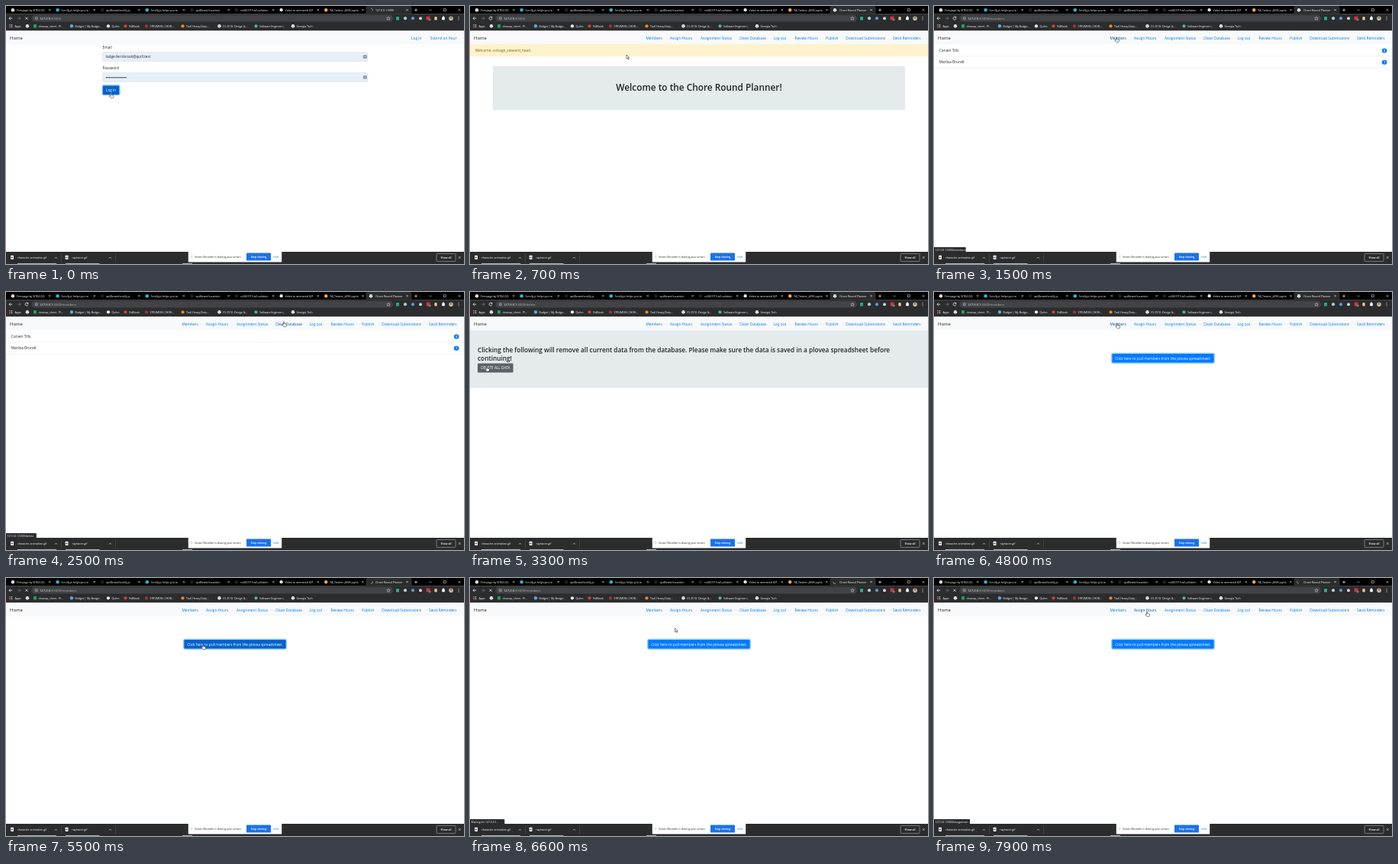
An HTML page for the animation above (8000 ms loop, 600 px wide and 338 px high).

```html
<!DOCTYPE html>
<html lang="en">
<head>
<meta charset="utf-8">
<title>Chore Round Planner</title>
<style>
html, body { margin: 0; width: 100%; height: 100%; overflow: hidden; background: #fff; }
#stage { display: block; width: 100%; height: 100%; font-family: "Open Sans", "Noto Sans", sans-serif; }
text { white-space: pre; }
.chrome { font-weight: 500; }
</style>
</head>
<body>
<svg id="stage" viewBox="0 0 600 338"></svg>
<script>
const LOOP = 8000, STEP = 100;
const APP = 'Chore Round Planner', HOST = '127.0.0.1', PORT = ':5000';
const BLUE = '#007bff', INK = '#212529', BAR = '#2b2c2e', LIGHT = '#fff', PANEL = '#e5eaec';
const stage = document.getElementById('stage');

const text = (x, y, size, str, fill = INK, attrs = '') =>
  `<text x="${x}" y="${y}" font-size="${size}" fill="${fill}" ${attrs}>${str}</text>`;
const rect = (x, y, w, h, fill, attrs = '') =>
  `<rect x="${x}" y="${y}" width="${w}" height="${h}" fill="${fill}" ${attrs}/>`;
const dot = (x, y, r, fill, attrs = '') => `<circle cx="${x}" cy="${y}" r="${r}" fill="${fill}" ${attrs}/>`;
const line = (d, stroke = LIGHT, width = .6, attrs = '') =>
  `<path d="${d}" fill="none" stroke="${stroke}" stroke-width="${width}" ${attrs}/>`;
const cross = (x, y, r, stroke, width) =>
  line(`M${x - r} ${y - r}l${2 * r} ${2 * r}M${x + r} ${y - r}l${-2 * r} ${2 * r}`, stroke, width);
const globe = (x, y) => dot(x, y, 2.2, LIGHT) +
  line(`M${x - 1.5} ${y - .6}q1 .1 1.2 .9t1 1M${x + .3} ${y - 1.6}q0 1 1.4 1`, '#555', .55);
const group = (id, body, attrs = '') => `<g id="${id}" ${attrs}>${body}</g>`;
const middle = 'text-anchor="middle"', semibold = 'font-weight="600"';
const focusRing = (x, y, w, h) =>
  rect(x - .5, y - .5, w + 1, h + 1, 'none', 'rx="1.6" stroke="#80bdff" stroke-width="1"');

// Browser chrome
const icons = {
  globe,
  teal: (x, y) => dot(x, y, 2.3, '#25b7d3'),
  dark: (x, y) => dot(x, y, 2.2, '#1f2124'),
  white: (x, y) => dot(x, y, 2.1, '#eee'),
  orange: (x, y) => dot(x, y, 2.2, '#f0a94a'),
  green: (x, y) => rect(x - 2, y - 2.2, 4, 4.4, '#1ea362', 'rx=".4"'),
  blue: (x, y) => dot(x, y, 2.2, '#6aa6c9'),
  red: (x, y) => dot(x, y, 2.1, '#e23a2e'),
  brick: (x, y) => dot(x, y, 2.1, '#a3332c'),
  amber: (x, y) => dot(x, y, 2.1, '#e8862e'),
  lime: (x, y) => dot(x, y, 2.1, '#52b788')
};

const tabs = [
  ['globe', 'Fernpage by SITE4 GO'], ['teal', 'Scrolly.js helps you to'],
  ['dark', 'quillbrant/scrolly.js'], ['teal', 'Scrolly.js helps you to'],
  ['dark', 'quillbrant/cuuemin'], ['dark', 'cs3451f19-a3-solution'],
  ['white', 'Video to animated GIF'], ['orange', 'PA_Twister_4496.ipynb']
];
const tabStrip = tabs.map(([icon, title], i) => {
  const x = 9 + i * 58.6;
  return icons[icon](x, 5.2) +
    `<svg x="${x + 5}" y="0" width="41.5" height="10">${text(0, 6.6, 3.56, title, LIGHT)}</svg>` +
    cross(x + 48.2, 5.2, 1.1, LIGHT, .55);
}).join('');

const bookmarks = [
  [28, 'globe', ''], [38, 'green', 'cleanup_sheet - Pl...'], [86, 'blue', 'Budget | My Budge...'],
  [134, 'white', 'Quilm'], [156.5, 'red', 'VidNook'], [184, 'brick', 'STRUMDEL CHOR...'],
  [231.5, 'amber', 'Tovil Heavy-Duty...'], [279.5, 'globe', 'CS 2510: Design &amp;...'],
  [327.5, 'lime', 'Software Engineeri...'], [376, 'globe', 'Georgia Tech']
];
const bookmarkBar = bookmarks.map(([x, icon, label]) =>
  icons[icon](x, 26.3) + text(x + 4.5, 27.6, 3.5, label, LIGHT)).join('');

let appGrid = '';
for (let i = 0; i < 9; i++)
  appGrid += rect(4 + i % 3 * 1.6, 24 + Math.floor(i / 3) * 1.6, 1.1, 1.1, ['#e2574c', '#5a9bf0', '#eac04c'][i % 3]);

const extensions =
  line('M501 13.9l.7 1.5 1.6 .2-1.2 1.1 .3 1.6-1.4-.8-1.4 .8 .3-1.6-1.2-1.1 1.6-.2z', LIGHT, .4) +
  rect(511, 14, 4, 4.4, '#1eb08a', 'rx=".5"') + dot(523, 16.2, 2.1, '#b9c4cb') +
  dot(533, 16.2, 2.1, '#5f92c8') + dot(543, 16.2, 2, '#d4d9d6') +
  rect(550.5, 13.6, 5, 4.6, '#d6303e', 'rx=".8"') + rect(553.5, 16.5, 3, 2.8, '#777', 'rx=".5"') +
  rect(561.3, 14, 3.4, 4.4, '#e6c789', 'rx="1"') +
  rect(571.2, 14.6, 3.6, 3.6, LIGHT, 'rx=".5"') + dot(573, 14.2, .9, LIGHT) +
  dot(583, 16.2, 2.8, '#c9b8a5') + dot(583, 15.5, 1.1, '#6f5a4c') +
  [14.5, 16.2, 17.9].map(y => dot(593, y, .5, LIGHT)).join('');

const topChrome =
  rect(0, 0, 600, 10.5, '#000') + tabStrip +
  `<path d="M469.5 10.5q2 0 2-2v-6.5q0-2 2-2h56q2 0 2 2v6.5q0 2 2 2z" fill="${BAR}"/>` +
  rect(0, 10.3, 600, 21.9, BAR) +
  group('favicon', globe(478, 5.2)) +
  group('spinner', line('M478 3a2.3 2.3 0 0 1 2 3.4', '#b4b8bd', .7)) +
  `<svg x="484" y="0" width="38" height="10">${text(0, 6.6, 3.56, '', LIGHT, 'id="tabTitle"')}</svg>` +
  cross(525.5, 5.2, 1.1, LIGHT, .55) + line('M537 3.3v4M535 5.3h4', LIGHT, .6) +
  line('M554.5 5.3h3', LIGHT, .5) + rect(573.5, 3.8, 2.9, 2.9, 'none', `stroke="${LIGHT}" stroke-width=".5"`) +
  cross(594, 5.3, 1.4, LIGHT, .5) +
  rect(33.5, 11.8, 473.5, 8.8, '#424346', 'rx="4.4"') +
  line('M8.4 16.2h-4.4m2-2l-2 2 2 2', LIGHT, .7) + line('M14.8 16.2h4.4m-2-2l2 2-2 2', '#85878a') +
  group('reload', line('M28.7 14.9a2 2 0 1 0 .3 1.8M29 13.8v1.5h-1.6', LIGHT, .7)) +
  group('stop', cross(27, 16.2, 1.5, LIGHT, .7)) +
  dot(39.8, 16.2, 1.7, 'none', 'stroke="#e0e0e0" stroke-width=".5"') + line('M39.8 15.9v1.2M39.8 15v.4', '#e0e0e0', .5) +
  text(44, 17.8, 4.15, `${HOST}<tspan id="path" fill="#b4b6b9"></tspan>`, LIGHT) +
  extensions + appGrid + text(11.5, 27.6, 3.56, 'Apps', LIGHT) + bookmarkBar;

const download = (x, name, end) =>
  rect(x - 1.8, 326.8, 3.8, 5.2, '#f2f2f2', 'rx=".4"') + dot(x, 329.6, 1, '#555') +
  text(x + 7, 331.3, 3.56, name, LIGHT) + line(`M${end - 8.5} 330.6l1.5-1.5 1.5 1.5`) +
  line(`M${end} 324.5v11`, '#66686b', .4);

const bottomChrome =
  rect(0, 322, 600, 16, BAR) + download(8, 'character animation.gif', 72.5) + download(79.5, 'raytracer.gif', 143.5) +
  line('M15 337.5h51M78 337.5h44.5M231 337.5h13', '#d4d6d8', .8) +
  rect(564, 324.4, 25, 10.2, 'none', 'rx="1.2" stroke="#c4c6c8" stroke-width=".5"') +
  text(576.5, 331, 3.5, 'Show all', LIGHT, middle + ' ' + semibold) + cross(594.2, 329.5, 1.5, LIGHT, .5) +
  rect(238.8, 321.6, 122.4, 13.9, '#fff') +
  line('M242.6 326.5v4M243.8 326.5v4', '#b4b4b4', .4) +
  text(247, 330.2, 3.35, 'Screen Recorder is sharing your screen.', '#222') +
  rect(315, 323.6, 32, 10, '#1a73e8', 'rx=".9"') + text(331, 330.1, 3.4, 'Stop sharing', '#fff', middle + ' ' + semibold) +
  text(350, 330.2, 3.5, 'Hide', '#1a73e8');

// Web pages
const link = (x, label) => text(x, 43.5, 4.8, label, BLUE, 'class="link"');
const menu = [[230.5, 'Members'], [262, 'Assign Hours'], [302, 'Assignment Status'], [353, 'Clean Database'],
  [397.5, 'Log out'], [425.5, 'Review Hours'], [466, 'Publish'], [492.3, 'Download Submissions'], [554, 'Send Reminders']];

const field = (y, value) =>
  rect(126.6, y, 347.2, 12, '#e6f0fa', 'rx="1.2" stroke="#ced4da" stroke-width=".4"') + value +
  rect(467.8, y + 3.8, 5, 4.4, '#8d9399', 'rx=".6"') +
  [469, 470.3, 471.6].map(x => dot(x, y + 6, .4, '#fff')).join('');
const bullets = Array.from({ length: 14 }, (_, i) => dot(131.6 + i * 1.95, 93.8, .78, INK)).join('');

const loginPage =
  link(531, 'Log in') + link(555.7, 'Submit an hour') +
  text(126.5, 56, 4.75, 'Email') + field(60.5, text(130.5, 68.3, 4.75, 'lodge.fernbrook@quill.test')) +
  text(126.5, 83, 4.75, 'Password') + field(87.4, bullets) +
  rect(126.6, 104.2, 22, 12, '#0062cc', 'rx="1.2"') + focusRing(126.6, 104.2, 22, 12) +
  text(137.6, 112, 4.75, 'Log in', '#fff', middle);

const welcome = rect(30, 57.6, 540, 57.6, PANEL, 'rx="1.4"') +
  text(300, 90, 11.85, `Welcome to the ${APP}!`, INK, middle + ' ' + semibold);
const flash = rect(0, 50.2, 600, 15.8, '#fff3cd') + line('M0 50.3h600M0 65.9h600', '#ffeeba', .4) +
  text(7, 60, 4.75, 'Welcome, cottage_steward_head', '#856404');

const member = (i, name) => {
  const y = 50.4 + i * 15.4;
  return line(`M0 ${y + 15.4}h600`, '#dcdcdc', .4) + text(6.7, y + 9.6, 4.75, name) +
    rect(586.8, y + 5, 6.6, 6, BLUE, 'rx="3"') + text(590.1, y + 9.2, 3.4, i, '#fff', middle + ' font-weight="700"');
};

const deletePage =
  rect(0, 50.2, 600, 75.3, PANEL) +
  text(10, 79, 8.27, 'Clicking the following will remove all current data from the database. Please make sure the data is saved in a plovea spreadsheet before', INK, semibold) +
  text(10, 89.5, 8.27, 'continuing!', INK, semibold) +
  rect(10, 93.5, 46.6, 12, '#6c757d', 'id="deleteButton" rx="1.2"') + text(33.3, 101.3, 4.75, 'DELETE ALL DATA', '#fff', middle);

const pullPage =
  rect(233.2, 80.7, 133.6, 12, BLUE, 'id="pullButton" rx="1.2"') + focusRing(233.2, 80.7, 133.6, 12) +
  text(300, 88.5, 4.75, 'Click here to pull members from the plovea spreadsheet.', '#fff', middle);

const outline = 'fill="#fff" stroke="#111" stroke-width=".5" stroke-linejoin="round"';
const cursor =
  group('arrow', `<path d="M0 0v5.2l1.2-1.1 .9 2 .9-.4-.9-1.9h1.7z" ${outline}/>`) +
  group('hand', `<path d="M-.6 .5q0-.7 .6-.7t.6 .7v2l2.4 .6q.7 .2 .6 1l-.4 1.5q-.2 .9-1 .9h-1.8q-.5 0-.9-.5l-1.7-2.2q.3-.9 1.6 .1z" ${outline}/>`);

stage.innerHTML =
  rect(0, 0, 600, 338, '#fff') + rect(0, 32, 600, 18.3, '#f8f9fa') + text(5, 44, 5.95, 'Home', '#1b1e21') +
  group('menu', menu.map(item => link(...item)).join('')) +
  group('login', loginPage) + group('flash', flash) + group('home', welcome) +
  group('members', member(0, 'Corven Tills') + member(1, 'Marlisa Brundt')) +
  group('delete', deletePage) + group('pull', pullPage) +
  group('bubble', rect(-1, 316, 40, 7, '#292a2d', 'id="bubbleBox" rx=".8" stroke="#55575b" stroke-width=".3"') +
    text(1.6, 320.7, 3.45, '', LIGHT, 'id="bubbleText"'), 'class="chrome"') +
  group('top', topChrome, 'class="chrome"') + group('bottom', bottomChrome, 'class="chrome"') +
  group('cursor', cursor);

const $ = id => document.getElementById(id);
const show = (id, on) => $(id).setAttribute('visibility', on ? 'visible' : 'hidden');
const links = [...$('menu').children];

// Timeline
const pages = [[0, 'login', ''], [300, 'flash', ''], [1500, 'members', '/members'], [2600, 'delete', '/delete'],
  [3700, 'home', ''], [4700, 'pull', '/members']];
const loads = [[0, 300], [1300, 1500], [3500, 3700], [4500, 4700], [5500, LOOP]];
const bubbles = [[0, ''], [1100, '/members'], [1700, ''], [2500, '/delete'], [2800, ''], [4500, '/members'],
  [4800, ''], [6000, 'wait'], [6800, '/assignment']];
const path = [[0, 137.5, 114], [500, 137.5, 114], [700, 205, 64], [1100, 239, 41], [1700, 239, 41], [2300, 360, 40],
  [2500, 364, 39], [2700, 364, 39], [3300, 22, 97.5], [3700, 22, 97.5], [4300, 237, 58.5], [4500, 240, 41],
  [4800, 240, 41], [5400, 258, 87], [6200, 258, 87], [7000, 279, 44], [LOOP, 279, 44]];

const latest = (list, t) => list.filter(entry => entry[0] <= t).pop();
const within = (x, y, x0, y0, x1, y1) => x >= x0 && x <= x1 && y >= y0 && y <= y1;

function pointer(t) {
  const i = path.findIndex(p => p[0] > t);
  const [t0, x0, y0] = path[i - 1], [t1, x1, y1] = path[i];
  const k = (t - t0) / (t1 - t0), e = k * k * (3 - 2 * k);
  return [x0 + (x1 - x0) * e, y0 + (y1 - y0) * e];
}

function draw(t) {
  const [, page, route] = latest(pages, t);
  const loading = loads.some(([from, to]) => t >= from && t < to);
  const [x, y] = pointer(t);

  for (const id of ['login', 'flash', 'members', 'delete', 'pull']) show(id, id === page);
  show('menu', page !== 'login');
  show('home', page === 'home' || page === 'flash');
  $('home').setAttribute('transform', `translate(0 ${page === 'flash' ? 21.2 : 0})`);

  show('spinner', loading);
  show('favicon', !loading);
  show('stop', loading);
  show('reload', !loading);
  $('spinner').setAttribute('transform', `rotate(${-t * .25} 478 5.2)`);
  $('tabTitle').textContent = page === 'login' ? HOST + PORT : APP;
  $('path').textContent = PORT + route;

  const status = latest(bubbles, t)[1];
  const label = status === 'wait' ? `Waiting for ${HOST}...` : HOST + PORT + status;
  show('bubble', status);
  $('bubbleText').textContent = label;
  $('bubbleBox').setAttribute('width', label.length * 1.8 + 3);

  let hot = page === 'login';
  links.forEach((node, i) => {
    const end = menu[i][0] + menu[i][1].length * 2.7;
    const over = page !== 'login' && within(x, y, menu[i][0] - 2, 36, end, 47);
    node.setAttribute('fill', over ? '#0056b3' : BLUE);
    hot = hot || over;
  });
  const overDelete = page === 'delete' && within(x, y, 10, 93.5, 56.6, 105.5);
  const overPull = page === 'pull' && within(x, y, 233, 80.7, 367, 92.7);
  $('deleteButton').setAttribute('fill', overDelete ? '#5a6268' : '#6c757d');
  $('pullButton').setAttribute('fill', overPull ? '#0062cc' : BLUE);
  hot = hot || overDelete || overPull;

  show('hand', hot);
  show('arrow', !hot);
  $('cursor').setAttribute('transform', `translate(${x} ${y})`);
}

const start = performance.now();
function tick() {
  const t = (performance.now() - start) % LOOP;
  draw(Math.floor(t / STEP) * STEP);
  requestAnimationFrame(tick);
}
tick();
</script>
</body>
</html>
```
